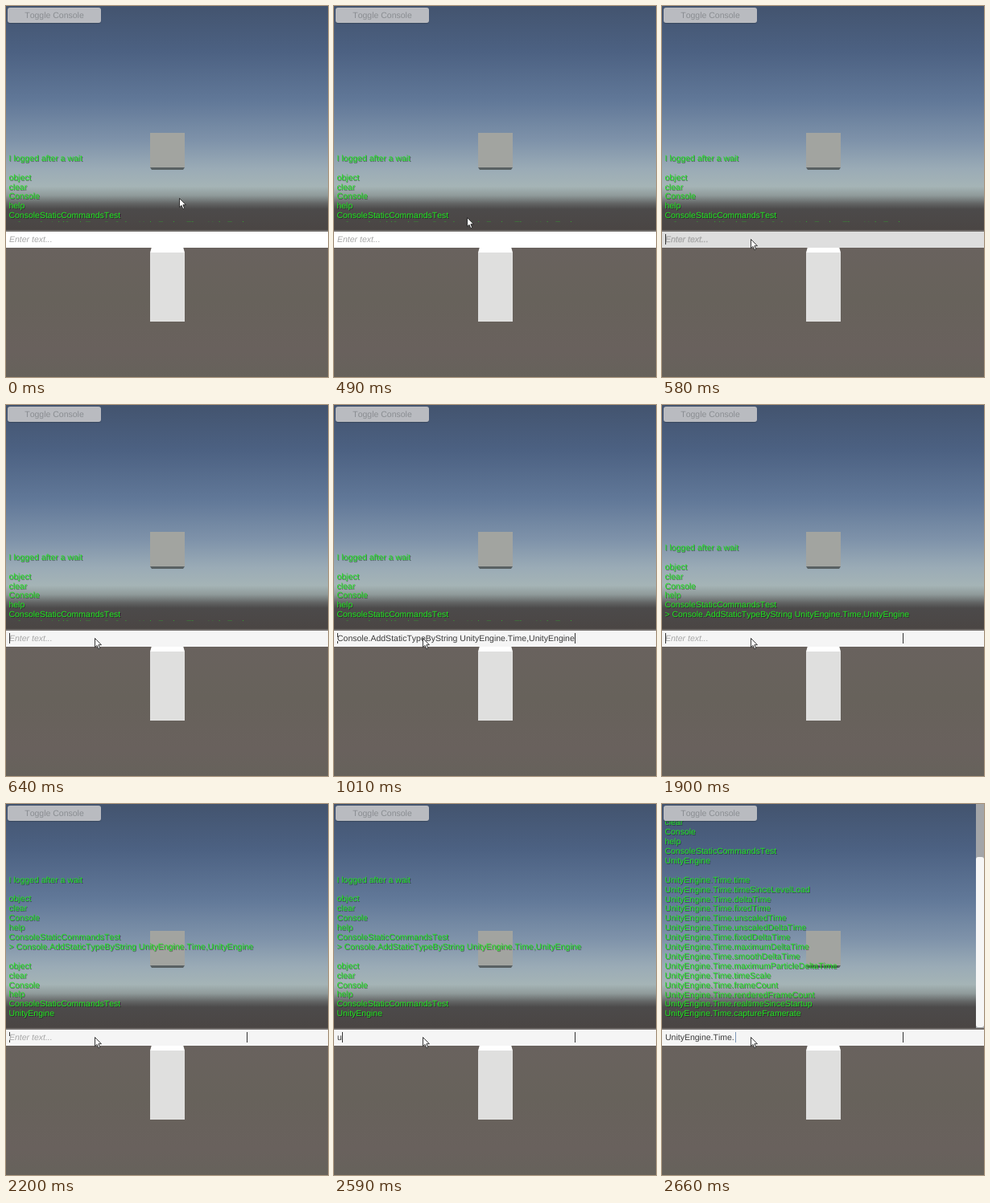
An HTML page that plays this animation: 400 by 462 pixels, repeating every 3.06 s.

```html
<!DOCTYPE html>
<html lang="en">
<head>
<meta charset="utf-8">
<title>Console</title>
<style>
html, body { margin: 0; width: 100%; height: 100%; overflow: hidden; }
body { position: relative; font: 10.5px/12px "Liberation Sans", Arial, sans-serif; font-kerning: none; text-rendering: geometricPrecision; }
svg, div, pre, span, i { position: absolute; }
svg { left: 0; top: 0; overflow: visible; }
.anim { animation: 3060ms step-end infinite; }

.panel { left: 0; top: 0; width: 400px; height: 269px; overflow: hidden; }
.log { left: 3.4px; top: 184.8px; margin: 0; font: inherit; line-height: 11.9px; color: #1fe71f; text-shadow: .8px .8px 0 rgba(0,0,0,.42); animation-name: log; }
.button { left: 2px; top: 2px; width: 116px; height: 19px; border-radius: 3px; background: #b9bbc0; box-shadow: 0 1px 1px rgba(40,48,60,.4); color: #8a8d91; text-align: center; line-height: 20px; }
.track { left: 390px; top: 0; width: 10px; height: 279px; background: #a3a5a8; opacity: 0; animation-name: done; }
.handle { left: 0; top: 66px; width: 10px; height: 212px; border-radius: 3px; background: #f6f6f6; }

.field { left: 0; top: 281px; width: 400px; height: 20px; background: #fff; animation-name: field; }
.field > * { opacity: 0; }
.field span { left: 4px; top: 4px; color: #3a3a3a; white-space: pre; }
.field .hint { color: #a6a6a6; font-style: italic; animation-name: hint; }
.command { animation-name: command; }
.letter { animation-name: letter; }
.done { animation-name: done; }
.selection { left: 4px; top: 3px; width: 295px; height: 13px; background: #afcdf3; animation-name: selection; }
.caret { top: 3px; width: 1px; height: 13px; background: #333; }
.start { left: 4px; background: linear-gradient(#333 5px, transparent 5px 10px, #333 10px); animation-name: start; }
.middle { left: 4px; top: 8px; height: 5px; animation-name: middle; }
.end { left: 299px; animation-name: end; }
.cursor { width: 10px; height: 16px; left: 215px; top: 239px; animation-name: cursor; }

@keyframes log {
  0% { top: 184.8px } 43.79% { top: 172.9px } 71.89% { top: 89.6px } 86.92%, 100% { top: -100.8px }
}
@keyframes field {
  0% { background: #fff } 16.99% { background: #f5f5f5 } 18.95% { background: #dedede } 20.91%, 100% { background: #f5f5f5 }
}
@keyframes hint {
  0% { opacity: 1; -webkit-text-stroke: 0 }
  18.95% { opacity: 1; -webkit-text-stroke: .3px #a6a6a6 }
  20.91% { opacity: 1; -webkit-text-stroke: 0 }
  33% { opacity: 0 } 62.09% { opacity: 1 } 84.64%, 100% { opacity: 0 }
}
@keyframes command { 0% { opacity: 0 } 33% { opacity: 1 } 62.09%, 100% { opacity: 0 } }
@keyframes selection { 0% { opacity: 0 } 43.79% { opacity: 1 } 62.09%, 100% { opacity: 0 } }
@keyframes letter { 0% { opacity: 0 } 84.64% { opacity: 1 } 86.92%, 100% { opacity: 0 } }
@keyframes done { 0% { opacity: 0 } 86.92%, 100% { opacity: 1 } }
@keyframes end { 0% { opacity: 0 } 33%, 100% { opacity: 1 } }
@keyframes start {
  0% { opacity: 0 } 18.95% { opacity: 1 } 43.79% { opacity: 0 } 62.09% { opacity: 1 } 84.64%, 100% { opacity: 0 }
}
@keyframes middle {
  0% { opacity: 0 } 18.95% { opacity: 1 } 27.45% { opacity: 0 }
  62.09% { opacity: 1 } 67.64% { opacity: 0 } 76.14% { opacity: 1 } 84.64%, 100% { opacity: 0 }
}
@keyframes cursor {
  0% { left: 215px; top: 239px }
  15.03% { left: 197px; top: 247px }
  16.01% { left: 165px; top: 263px }
  16.99% { left: 130px; top: 282px }
  17.97% { left: 112px; top: 290px }
  18.95%, 100% { left: 110px; top: 290px }
}
</style>
</head>
<body>
<svg width="400" height="462">
  <defs>
    <linearGradient id="sky" x1="0" y1="0" x2="0" y2="281" gradientUnits="userSpaceOnUse">
      <stop offset="0" stop-color="#43546f"/>
      <stop offset=".2" stop-color="#4c6182"/>
      <stop offset=".42" stop-color="#617898"/>
      <stop offset=".6" stop-color="#7f93aa"/>
      <stop offset=".72" stop-color="#9aabb6"/>
      <stop offset=".8" stop-color="#a5b4b6"/>
      <stop offset=".84" stop-color="#8f9a9a"/>
      <stop offset=".875" stop-color="#636565"/>
      <stop offset=".9" stop-color="#4c4a4a"/>
      <stop offset="1" stop-color="#4a4543"/>
    </linearGradient>
    <linearGradient id="ground" x1="0" y1="0" x2="0" y2="1">
      <stop offset="0" stop-color="#69625e"/>
      <stop offset=".4" stop-color="#67625b"/>
      <stop offset=".8" stop-color="#69615d"/>
      <stop offset="1" stop-color="#66625b"/>
    </linearGradient>
  </defs>
  <rect width="400" height="281" fill="url(#sky)"/>
  <rect y="279" width="400" height="2" fill="#706c6a"/>
  <rect y="300" width="400" height="162" fill="url(#ground)"/>
  <path d="M179 201H222L220 204H181Z" fill="#596163"/>
  <rect x="179" y="158" width="43" height="43" fill="#a2a4a0"/>
  <path d="M181 300H220L222 307H179Z" fill="#fff"/>
  <rect x="179" y="307" width="43" height="86" fill="#dfdfde"/>
</svg>

<div class="panel"><pre class="log anim"></pre></div>
<div class="button">Toggle Console</div>
<div class="track anim"><div class="handle"></div></div>

<div class="field anim">
  <i class="selection anim"></i>
  <span class="hint anim">Enter text...</span>
  <span class="command anim">Console.AddStaticTypeByString UnityEngine.Time,UnityEngine</span>
  <span class="letter anim">u</span>
  <span class="done anim">UnityEngine.Time.</span>
  <i class="caret start anim"></i>
  <i class="caret middle anim"></i>
  <i class="caret end anim"></i>
  <i class="caret letter anim" style="left:10px"></i>
  <i class="caret done anim" style="left:91px;background:#7d97b8"></i>
</div>

<svg class="cursor anim" viewBox="0 0 10 16">
  <path d="M.5 .5V11.7L3 9.4L4.8 13.7L6.7 12.9L4.9 8.7H8.4Z" fill="#fff" stroke="#222" stroke-width=".9"/>
</svg>

<script>
const commands = ['object', 'clear', 'Console', 'help', 'ConsoleStaticCommandsTest'];
const members = `time timeSinceLevelLoad deltaTime fixedTime unscaledTime unscaledDeltaTime
  fixedDeltaTime maximumDeltaTime smoothDeltaTime maximumParticleDeltaTime timeScale
  frameCount renderedFrameCount realtimeSinceStartup captureFramerate`.split(/\s+/);

document.querySelector('.log').textContent = [
  'I logged after a wait', '', ...commands,
  '> ' + document.querySelector('.command').textContent,
  '', ...commands, 'UnityEngine',
  '', ...members.map(name => 'UnityEngine.Time.' + name)
].join('\n');
</script>
</body>
</html>
```
